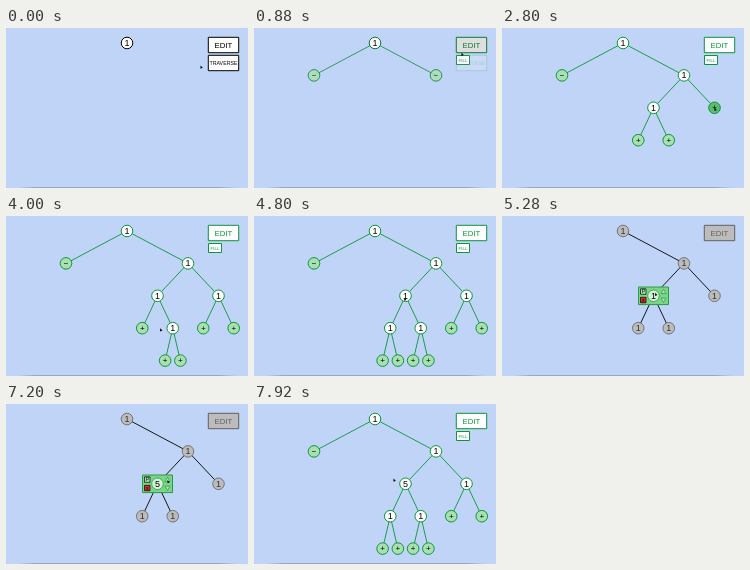
Recreate the animation shown at these times as an HTML page with a canvas. Size 242 by 160 pixels, loop 8 s.

```html
<!DOCTYPE html>
<html lang="en">
<head>
<meta charset="utf-8">
<title>Tree editor</title>
<style>
  html, body { margin: 0; width: 100%; height: 100%; overflow: hidden; background: #c0d4f7; }
  canvas { display: block; width: 100vw; height: 100vh; }
</style>
</head>
<body>
<canvas id="stage"></canvas>
<script>
const W = 242, H = 160, LOOP = 8000;
const EDIT_AT = 720, OPEN_AT = 1300, OPEN_STEP = 760;
const PANEL_AT = 5080, COUNT_AT = 6000, COUNT_STEP = 400, CLOSE_AT = 7560;
const canvas = document.getElementById('stage');
const ctx = canvas.getContext('2d');

const BLACK = [0, 0, 0], WHITE = [255, 255, 255], GREEN = [10, 151, 55];
const LEAF = [168, 224, 178], LEAF_HOVER = [92, 188, 112], GREY = [188, 188, 188];
const HOVER = [222, 222, 222], DIM = [96, 96, 96], RED = [214, 42, 48];
const PANEL = [122, 213, 134], PANEL_EDGE = [40, 155, 70];

const clamp = v => Math.max(0, Math.min(1, v));
const ramp = (t, start, length) => clamp((t - start) / length);
const smooth = k => k * k * (3 - 2 * k);
const mix = (a, b, k) => a.map((v, i) => v + (b[i] - v) * k);
const css = c => `rgb(${c.map(Math.round).join(',')})`;

// Every level halves the horizontal spread. Opening a node adds two children.
const nodes = [];
function addNode(parent, side, born) {
  const depth = parent ? parent.depth + 1 : 0;
  const n = {
    parent, depth, born, opened: Infinity,
    x: parent ? parent.x + side * 122 / 2 ** depth : 121,
    y: 15 + 32.4 * depth
  };
  nodes.push(n);
  return n;
}
function open(n, time, born = time) {
  n.opened = born;
  n.children = [-1, 1].map(side => addNode(n, side, time));
  return n.children;
}

const root = addNode(null, 0, -LOOP);
const [, right] = open(root, EDIT_AT, -LOOP);
const openAt = i => OPEN_AT + OPEN_STEP * i;
const [inner, outer] = open(right, openAt(0));
const [low, high] = open(inner, openAt(1));
open(outer, openAt(2));
open(high, openAt(3));
open(low, openAt(4));

// The pointer rests at each visit and glides between them.
const visit = (p, from, to) => ({ x: p.x, y: p.y, from, to });
const arrow = { x: 161.5, y: 76 }, confirm = { x: 139.5, y: 74.5 };
const visits = [
  visit({ x: 194.5, y: 37.5 }, 0, 80),
  visit({ x: 215, y: 18 }, 400, EDIT_AT),
  ...[right, inner, outer, high, low].map((n, i) => visit(n, openAt(i) - 60, openAt(i) + 200)),
  visit({ x: inner.x + 1, y: inner.y - 3 }, PANEL_AT - 200, PANEL_AT + 80),
  visit(arrow, COUNT_AT - 80, COUNT_AT + 3 * COUNT_STEP + 80),
  visit(confirm, CLOSE_AT - 80, LOOP)
];

function pointerAt(t) {
  const b = visits.find(v => t <= v.to) || visits[visits.length - 1];
  const a = visits[visits.indexOf(b) - 1] || b;
  const k = a === b ? 1 : smooth(ramp(t, a.to, b.from - a.to));
  return [a.x + (b.x - a.x) * k, a.y + (b.y - a.y) * k];
}

function label(text, x, y, size, color) {
  ctx.font = `${size}px "Liberation Sans", Arial, sans-serif`;
  ctx.fillStyle = css(color);
  ctx.fillText(text, x, y);
}

function paint(fill, stroke, width) {
  ctx.fillStyle = css(fill);
  ctx.fill();
  ctx.strokeStyle = css(stroke);
  ctx.lineWidth = width;
  ctx.stroke();
}

function box(x, y, w, h, fill, stroke, width = 1) {
  ctx.beginPath();
  ctx.rect(x, y, w, h);
  paint(fill, stroke, width);
}

function disc(x, y, r, fill, stroke, width = 1) {
  ctx.beginPath();
  ctx.arc(x, y, r, 0, Math.PI * 2);
  paint(fill, stroke, width);
}

function triangle(x, y, dir) {
  ctx.beginPath();
  ctx.moveTo(x - 2.5, y + 2 * dir);
  ctx.lineTo(x + 2.5, y + 2 * dir);
  ctx.lineTo(x, y - 2.5 * dir);
  ctx.closePath();
  paint(LEAF, PANEL_EDGE, .7);
}

function button(text, x, y, w, h, size, fill, ink, alpha) {
  ctx.globalAlpha = alpha;
  box(x, y, w, h, fill, ink);
  label(text, x + w / 2, y + h / 2 + .4, size, ink);
  ctx.globalAlpha = 1;
}

function popup(value, alpha) {
  const { x, y } = inner;
  ctx.globalAlpha = alpha;
  box(x - 15, y - 8.8, 30, 17.6, PANEL, PANEL_EDGE);
  [['P', LEAF], ['x', RED]].forEach(([mark, fill], i) => {
    const top = y - 7 + i * 8.5;
    box(x - 13, top, 5.5, 5.5, fill, BLACK, .7);
    label(mark, x - 10.2, top + 3, 5, BLACK);
    triangle(x + 10, top + 2.8, 1 - 2 * i);
  });
  disc(x, y, 5.8, [214, 240, 218], PANEL_EDGE, .8);
  label(value, x, y + .4, 9, BLACK);
  ctx.globalAlpha = 1;
}

function drawTree(t, panel, ink, value, px, py) {
  const visible = n => ramp(t, n.born, 200) * (t < n.opened ? 1 - panel : 1);
  for (const n of nodes.slice(1)) {
    ctx.globalAlpha = visible(n);
    ctx.strokeStyle = css(ink);
    ctx.lineWidth = .9;
    ctx.beginPath();
    ctx.moveTo(n.parent.x, n.parent.y);
    ctx.lineTo(n.x, n.y);
    ctx.stroke();
  }
  for (const n of nodes) {
    const isOpen = t >= n.opened;
    const leaf = Math.hypot(px - n.x, py - n.y) < 6 ? LEAF_HOVER : LEAF;
    const fill = mix(mix(leaf, WHITE, ramp(t, n.opened, 200)), GREY, panel);
    const text = isOpen ? (n === inner ? value : 1) : n.depth === 1 ? '−' : '+';
    ctx.globalAlpha = visible(n);
    disc(n.x, n.y, 5.8, fill, mix(ink, DIM, panel), 1 - .2 * panel);
    label(text, n.x, n.y + .4, isOpen ? 9 : 8, mix(BLACK, DIM, panel * .5));
  }
  ctx.globalAlpha = 1;
}

function draw(t) {
  const edit = ramp(t, EDIT_AT - 40, 240);
  const panel = ramp(t, PANEL_AT, 180) - ramp(t, CLOSE_AT, 240);
  const ink = mix(mix(BLACK, GREEN, edit), BLACK, panel);
  const value = 1 + Math.max(0, Math.min(4, Math.floor((t - COUNT_AT) / COUNT_STEP) + 1));
  const [px, py] = pointerAt(t);

  ctx.fillStyle = '#c0d4f7';
  ctx.fillRect(0, 0, W, H);
  const shade = ctx.createLinearGradient(12, 0, 230, 0);
  [0, .08, .92, 1].forEach((stop, i) =>
    shade.addColorStop(stop, `rgba(110,120,140,${i % 3 ? .5 : 0})`));
  ctx.fillStyle = shade;
  ctx.fillRect(12, 159, 218, 1);

  ctx.textAlign = 'center';
  ctx.textBaseline = 'middle';
  drawTree(t, panel, ink, value, px, py);

  const hover = y => px > 202 && py > y && py < y + 16 ? HOVER : WHITE;
  button('EDIT', 202.3, 9.3, 30.4, 15.4, 7.8, mix(hover(9), GREY, panel), mix(ink, DIM, panel), 1);
  button('TRAVERSE', 202.3, 27.3, 30.4, 15.4, 5.3, hover(27), ink, 1 - edit);
  button('FILL', 202.5, 27.5, 13, 9, 4.4, WHITE, ink, edit * (1 - panel));
  if (panel > 0) popup(value, panel);

  ctx.beginPath();
  ctx.moveTo(px, py);
  ctx.lineTo(px, py + 3.2);
  ctx.lineTo(px + 2.3, py + 2.3);
  ctx.fillStyle = '#000';
  ctx.fill();
}

function frame(now) {
  const ratio = window.devicePixelRatio || 1;
  const w = Math.round(innerWidth * ratio), h = Math.round(innerHeight * ratio);
  if (canvas.width !== w || canvas.height !== h) {
    canvas.width = w;
    canvas.height = h;
  }
  ctx.setTransform(w / W, 0, 0, h / H, 0, 0);
  draw(now % LOOP);
  requestAnimationFrame(frame);
}
frame(performance.now());
</script>
</body>
</html>
```
